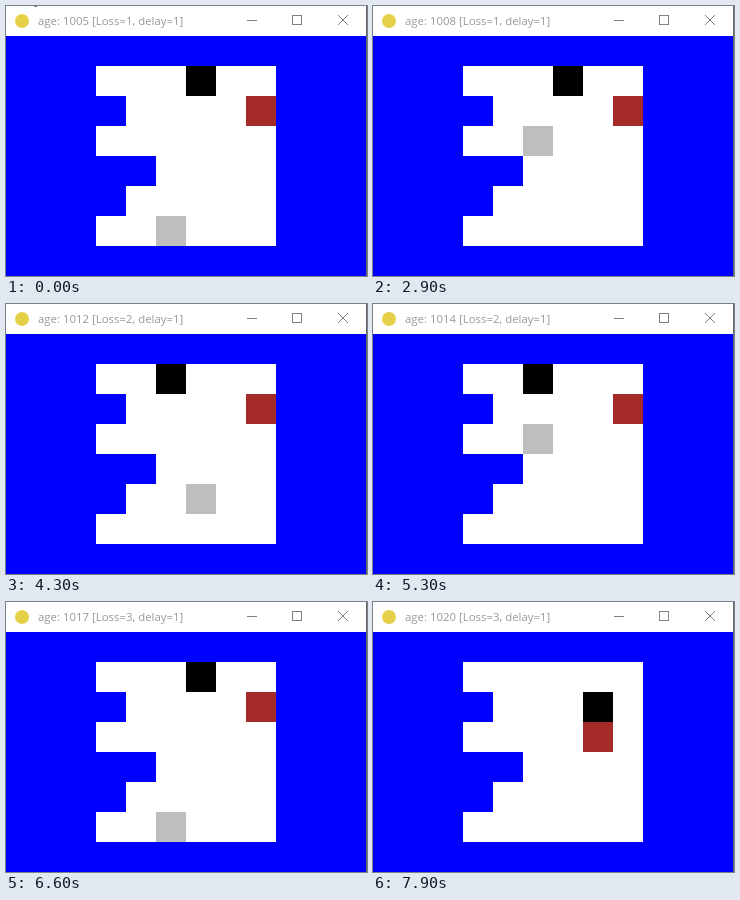
An HTML page that plays this animation: 361x270 px, repeating every 8 s.

```html
<!DOCTYPE html>
<html lang="en">
<head>
<meta charset="utf-8">
<title>Grid world</title>
<style>
  html, body { margin: 0; width: 100%; height: 100%; overflow: hidden; background: #fff; }
  svg { display: block; width: 100%; height: 100%; }
  text { font: 11.4px "Open Sans", "Noto Sans", sans-serif; fill: #999; }
</style>
</head>
<body>
<svg viewBox="0 0 361 270" shape-rendering="crispEdges">
  <rect width="361" height="270" fill="#fff"/>
  <rect id="speck" x="28" width="3" height="1" fill="#777"/>
  <circle cx="16" cy="15" r="7" fill="#e6d04a" shape-rendering="auto"/>
  <text id="title" x="32" y="19"></text>
  <g fill="none" stroke="#808080">
    <path d="M241 14.5h10M286.5 9.5h9v9h-9z"/>
    <path d="M332 9l10 10M342 9l-10 10" shape-rendering="auto"/>
  </g>
  <rect y="30" width="360" height="240" fill="#00f"/>
  <path fill="#fff" d="M90 60H270V240H90V210H120V180H150V150H90V120H120V90H90z"/>
  <rect id="gray" width="30" height="30" fill="#bebebe"/>
  <rect id="brown" width="30" height="30" fill="#a52a2a"/>
  <rect id="black" width="30" height="30" fill="#000"/>
  <path d="M360.5 0V270" stroke="#666"/>
</svg>
<script>
const LOOP = 8000, CELL = 30, FIRST_AGE = 1005, EPISODE = 6;
const $ = id => document.getElementById(id);

// start time, then column+row of the gray, black and brown cells
const steps = [
  [0, "57", "62", "83"],
  [2200, "66", "52", "83"],
  [2500, "55", "52", "83"],
  [2900, "54", "62", "83"],
  [3200, "63", "62", "83"],
  [3600, "62", "62", "83"],
  [3900, "57", "62", "83"],
  [4300, "66", "52", "83"],
  [4700, "55", "52", "83"],
  [5300, "54", "52", "83"],
  [5800, "53", "52", "74"],
  [6200, "52", "52", "74"],
  [6600, "57", "62", "83"],
  [7000, "66", "62", "83"],
  [7400, "65", "72", "83"],
  [7900, "74", "73", "74"]
];

function place(id, [col, row]) {
  $(id).setAttribute("x", col * CELL);
  $(id).setAttribute("y", row * CELL);
}

function render(t) {
  const i = steps.findLastIndex(s => s[0] <= t);
  const [, gray, black, brown] = steps[i];
  const loss = 1 + Math.floor(i / EPISODE);
  place("gray", gray);
  place("black", black);
  place("brown", brown);
  $("title").textContent = `age: ${FIRST_AGE + i} [Loss=${loss}, delay=1]`;
  $("speck").setAttribute("visibility", t < 400 ? "visible" : "hidden");
}

const start = performance.now();
function tick() {
  render((performance.now() - start) % LOOP);
  requestAnimationFrame(tick);
}
tick();
</script>
</body>
</html>
```
